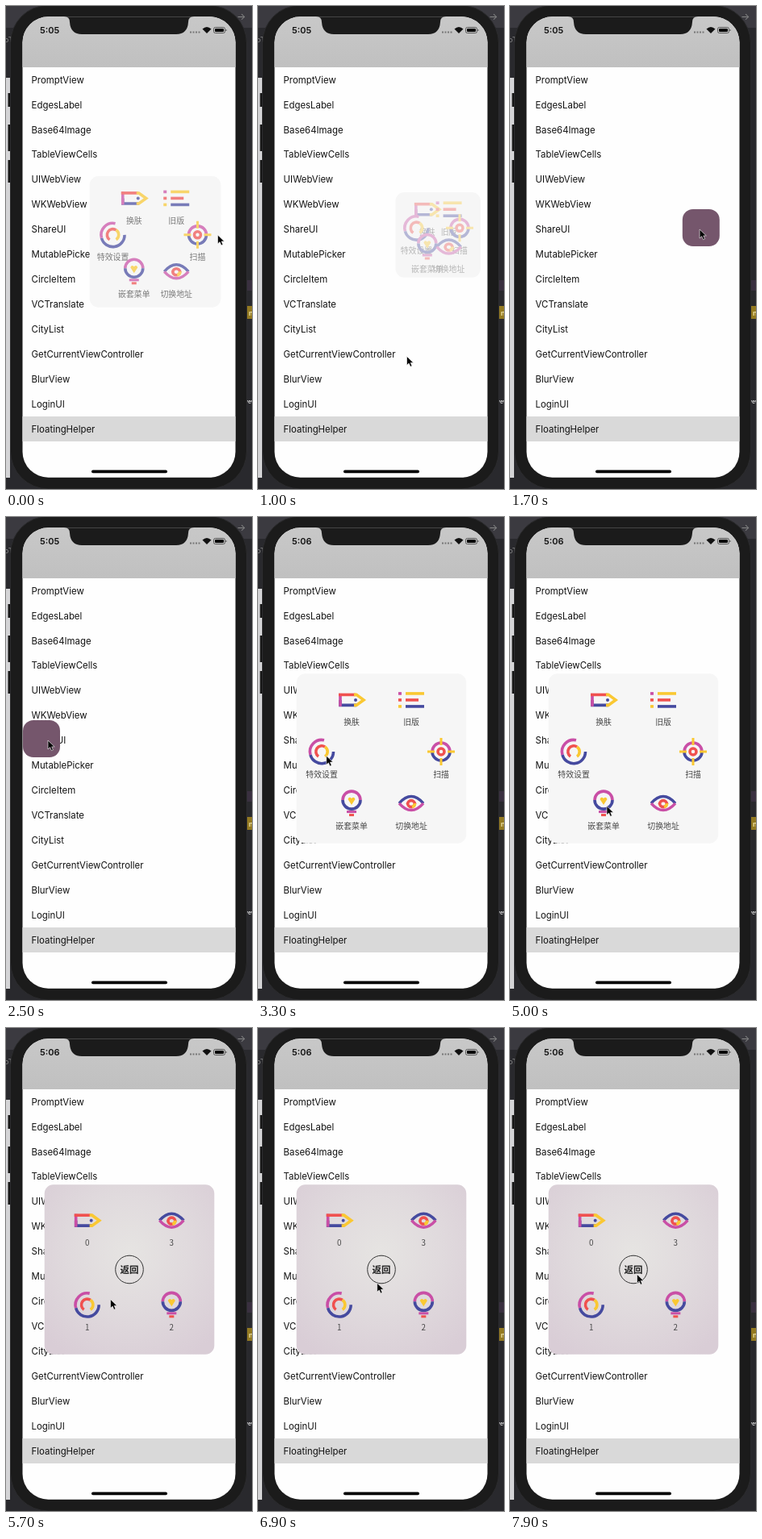
An HTML page for the animation above (8 s loop, 305 by 599 pixels).

```html
<!DOCTYPE html>
<html lang="zh">
<head>
<meta charset="utf-8">
<style>
html, body { margin: 0; width: 100%; height: 100%; overflow: hidden; background: #29292d; }
svg { display: block; width: 305px; height: 599px; font-family: Inter, "Liberation Sans", sans-serif; }
.cjk { font-family: "Noto Sans CJK SC", "Noto Sans CJK", sans-serif; text-anchor: middle; }
.label { font-size: 9.9px; fill: #484848; }
.icon { fill: none; stroke-width: 3.6; }
</style>
</head>
<body>
<svg viewBox="0 0 305 599">
  <defs>
    <linearGradient id="bar" x2="0" y2="1"><stop stop-color="#c8c8c8"/><stop offset="1" stop-color="#c0c0c0"/></linearGradient>
    <radialGradient id="blur" cx=".5" cy=".4" r=".7"><stop stop-color="#e6e4e2"/><stop offset=".5" stop-color="#e0dadd"/><stop offset="1" stop-color="#d9cdd6"/></radialGradient>
    <clipPath id="screen"><rect x="20.5" y="13.3" width="264" height="571.4" rx="32"/></clipPath>
  </defs>

  <!-- desktop behind the phone -->
  <rect width="305" height="599" fill="#29292d"/>
  <rect width="305" height="27" fill="#3b3a40"/>
  <rect y="89" width="5" height="496" fill="#d4d4d6"/>
  <text x="-2" y="45" font-size="9" fill="#888">oTo</text>
  <text x="286" y="17" font-size="12" fill="#888">→</text>
  <rect x="296" y="340" width="9" height="13" fill="#3a3040"/>
  <rect x="297" y="372" width="8" height="16" fill="#947a22"/>
  <text x="301" y="384" font-size="9" font-weight="600" fill="#f4e9b0">n</text>
  <text x="296" y="493" font-size="7" font-weight="600" fill="#ddd">vew</text>

  <!-- phone -->
  <path d="M4 108v17M4 147v33M4 191v28" stroke="#161616" stroke-width="3"/>
  <rect x="5.5" y="-1" width="293" height="600" rx="47" fill="#1b1b1b" stroke="#2c2c2e"/>
  <g clip-path="url(#screen)">
    <rect x="20" y="13" width="265" height="572" fill="#fefefe"/>
    <rect x="20" y="13" width="265" height="63" fill="url(#bar)"/>
    <rect x="20" y="509" width="265" height="31" fill="#d9d9d9"/>
    <path d="M72 13q7 0 7 7q1 15 15 15h117q14 0 15-15q0-7 7-7z" fill="#1b1b1b"/>
    <g id="rows" font-size="11.4" fill="#111"></g>
    <rect x="106" y="575.5" width="94" height="3.7" rx="1.8"/>
  </g>
  <text id="clock" x="42" y="34" font-size="11" font-weight="600" fill="#111"></text>
  <path d="M228 32.5h13" stroke="#777" stroke-width="2" stroke-dasharray="2 1.5"/>
  <path d="M243.5 28.5q5.5-5 11 0l-5.5 5.5z" fill="#111"/>
  <rect x="257.5" y="26.5" width="14" height="7" rx="2" fill="none" stroke="#555"/>
  <rect x="259" y="28" width="11" height="4" rx="1"/>
  <path d="M273 29v2" stroke="#555"/>

  <rect id="panel" fill="#f6f6f6"/>
  <rect id="photo" fill="url(#blur)"/>
  <rect id="badge" fill="#75566c"/>
  <g id="menus"></g>
  <g id="back">
    <circle cx="153" cy="299.5" r="17.3" fill="none" stroke="#333"/>
    <text class="cjk" x="153" y="303.5" font-size="11.5" font-weight="700" fill="#222">返回</text>
  </g>
  <path id="cursor" d="M0 0V11L2.6 8.6L4.4 12.7L6.4 11.9L4.7 7.9H8.2Z" stroke="#fff" stroke-width=".6"/>
</svg>
<script>
const $ = id => document.getElementById(id);
const RED = '#f0514f', YELLOW = '#fac832', BLUE = '#454a9f', PINK = '#c94fa6';
const stroke = (d, color, extra = '') => `<path d="${d}" stroke="${color}" ${extra}/>`;
const fill = (d, color) => `<path d="${d}" fill="${color}"/>`;

const icons = {
  pen: stroke('M-14 0V6.5H6', BLUE) + stroke('M-14 8V-8', PINK) + stroke('M-16-6.5H5', RED) +
    stroke('M3-6.5H6L15 0L6 6.5H3', YELLOW) + '<circle cx="5" r="2" fill="#454a9f"/>',
  list: stroke('M-7-8H16', YELLOW) + stroke('M-7 0H9', RED) + stroke('M-7 8H16', BLUE) +
    stroke('M-16-8h4', PINK) + stroke('M-16 0h4', RED) + stroke('M-16 8h4', YELLOW),
  ring: stroke('M-14 4A14.5 14.5 0 0 1 3-14.2', PINK) + stroke('M-14 4A14.5 14.5 0 0 0 14.5 0', BLUE) +
    stroke('M-4 6A7.2 7.2 0 0 1 4-6', RED) + stroke('M4-6A7.2 7.2 0 0 1 4 6', YELLOW),
  scan: stroke('M-11 0A11 11 0 0 1 11 0', PINK) + stroke('M-11 0A11 11 0 0 0 11 0', BLUE) +
    stroke('M-17 0h9M17 0h-9M0-17v9M0 17v-9', YELLOW, 'stroke-width="3"') +
    '<circle r="4" stroke="#f0514f" stroke-width="3.5"/>',
  bulb: stroke('M-11-4A11 11 0 0 1 11-4', PINK) + stroke('M-11-4A11 11 0 0 0 11-4', BLUE) +
    fill('M0 2L-4.5-5Q-3-9 0-6Q3-9 4.5-5Z', YELLOW) +
    stroke('M-6 10.5H6', PINK, 'stroke-width="3"') + stroke('M-3 14.5H3', RED, 'stroke-width="3"'),
  eye: stroke('M-15 0Q0-17 15 0', BLUE, 'stroke-width="3.5"') + stroke('M-15 0Q0 17 15 0', PINK, 'stroke-width="3.5"') +
    stroke('M-4.5 1A4.5 4.5 0 0 1 4.5 1', RED) + stroke('M-4.5 0A4.5 4.5 0 0 0 4.5 0', RED) +
    stroke('M1 4.5A4.5 4.5 0 0 0 4.5 0', YELLOW)
};

// Each item: icon, label, angle on the circle in degrees
const menus = [
  [['pen', '换肤', -120], ['list', '旧版', -60], ['ring', '特效设置', 180],
   ['scan', '扫描', 0], ['bulb', '嵌套菜单', 120], ['eye', '切换地址', 60]],
  [['pen', '轻时尚版', 180], ['ring', '普通模式', 0]],
  [['pen', '0', -135], ['ring', '1', 135], ['bulb', '2', 45], ['eye', '3', -45]]
];
$('menus').innerHTML = menus.map(items => '<g>' + items.map(([icon, label]) =>
  `<g><g class="icon" transform="translate(0 -8.5)">${icons[icon]}</g><text class="cjk label" y="23">${label}</text></g>`
).join('') + '</g>').join('');

$('rows').innerHTML = ['PromptView', 'EdgesLabel', 'Base64Image', 'TableViewCells', 'UIWebView', 'WKWebView',
  'ShareUI', 'MutablePicker', 'CircleItem', 'VCTranslate', 'CityList', 'GetCurrentViewController', 'BlurView',
  'LoginUI', 'FloatingHelper'].map((name, i) => `<text x="31.6" y="${95.7 + i * 30.93}">${name}</text>`).join('');

const ease = (t, start, length = 300) => {
  const u = Math.min(1, Math.max(0, (t - start) / length));
  return u * u * (3 - 2 * u);
};
const mix = (a, b, p) => a + (b - a) * p;

// Keys: time, x, y
function along(keys, t) {
  let i = 0;
  while (i < keys.length - 2 && t >= keys[i + 1][0]) i++;
  const [a, b] = [keys[i], keys[i + 1]], p = ease(t, a[0], b[0] - a[0]);
  return [mix(a[1], b[1], p), mix(a[2], b[2], p)];
}
const cursorKeys = [[0, 262.5, 284], [150, 262.5, 284], [750, 184.5, 434.5], [1050, 184.5, 434.5], [1450, 260, 277],
  [1550, 260, 277], [2250, 52, 277], [2750, 52, 277], [3400, 87, 297.5], [3850, 87, 297.5], [4200, 151, 297],
  [4400, 151, 297], [4850, 120, 358.5], [5150, 120, 358.5], [5650, 129.5, 336.5], [6300, 129.5, 336.5],
  [7300, 157.5, 305.5], [8000, 157.5, 305.5]];
const badgeKeys = [[1550, 263, 275], [2250, 44, 275]];

function place(id, x, y, size, radius, opacity) {
  const set = { x: x - size / 2, y: y - size / 2, width: size, height: size, rx: radius, opacity };
  for (const key in set) $(id).setAttribute(key, set[key]);
}

function spread(menu, cx, cy, p) {
  const group = $('menus').children[menu];
  group.setAttribute('opacity', p);
  menus[menu].forEach(([, , angle], i) => {
    const a = angle * Math.PI / 180, r = 74 * p;
    group.children[i].setAttribute('transform', `translate(${cx + r * Math.cos(a)} ${cy + r * Math.sin(a)})`);
  });
}

function draw(t) {
  const open = ease(t, -192) - ease(t, 823) + ease(t, 2700);
  const [bx, by] = along(badgeKeys, t);
  const x = mix(bx, 153, open), y = mix(by, 299.5, open), size = mix(46, 210.5, open);
  const sub1 = ease(t, 3713) - ease(t, 4300, 150);
  const sub2 = ease(t, 5215);
  const nested = ease(t, 3600, 115) - ease(t, 4350, 115) + ease(t, 5110, 105);
  const main = open - ease(t, 3600, 115) + ease(t, 4450) - ease(t, 5110, 105);

  place('panel', x, y, size, 11, Math.min(1, open * 4));
  place('photo', x, y, size, 11, nested);
  place('badge', x, y, size, 13, Math.max(0, 1 - open * 4));
  [main, sub1, sub2].forEach((p, i) => spread(i, x, y, p));
  $('back').setAttribute('opacity', Math.min(1, (sub1 + sub2) * 5));
  $('clock').textContent = t < 3000 ? '5:05' : '5:06';
  $('cursor').setAttribute('transform', `translate(${along(cursorKeys, t)})`);
}

function tick() {
  draw(performance.now() % 8000);
  requestAnimationFrame(tick);
}
tick();
</script>
</body>
</html>
```
